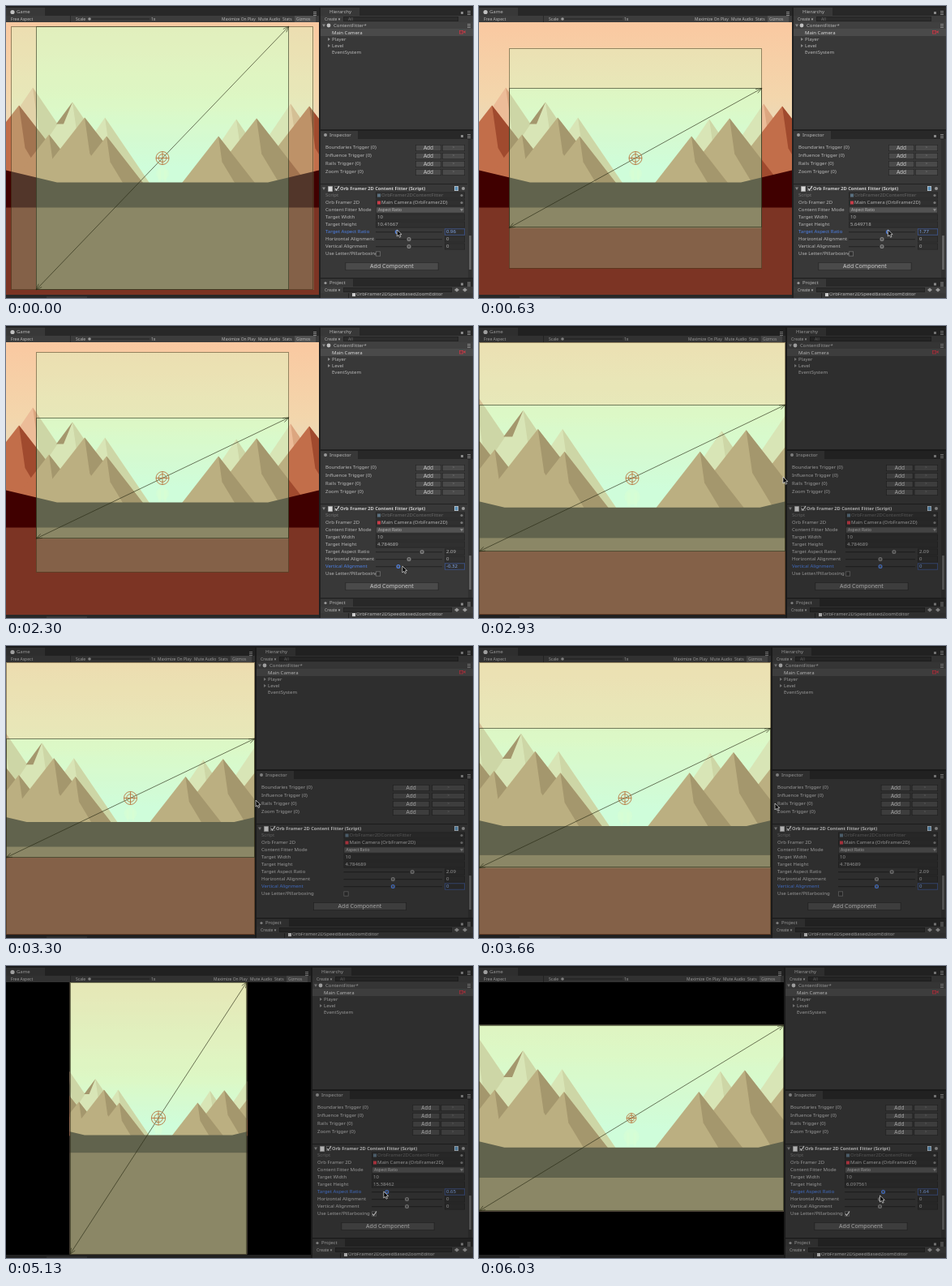
Recreate the animation shown at these times as an HTML page with a canvas. Size 576 by 360 pixels, loop 6.1 s.

```html
<!DOCTYPE html>
<html lang="en">
<head>
<meta charset="utf-8">
<title>Content fitter</title>
<style>
html, body { margin: 0; width: 100%; height: 100%; overflow: hidden; background: #282828; }
canvas { display: block; }
</style>
</head>
<body>
<canvas id="stage" width="576" height="360"></canvas>
<script>
const ctx = document.getElementById('stage').getContext('2d');
const LOOP = 6100, TOP = 20, BOTTOM = 356, MID = 187.5, VIEW_H = BOTTOM - TOP;

// ---- Motion ----

// Eased progress from 0 to 1 between two times
function ease(t, from, to) {
  const u = Math.min(1, Math.max(0, (t - from) / (to - from)));
  return u * u * (3 - 2 * u);
}

const span = (t, from, to) => Math.min(1, Math.max(0, (t - from) / (to - from)));
const aspectAt = t => .96 + 1.13 * ease(t, 130, 900) - 1.44 * ease(t, 4420, 5130) + .99 * ease(t, 5200, 6030);
const alignAt = t => .9 * Math.sin(2 * Math.PI * span(t, 1400, 2670) ** 1.7);
const dividerAt = t =>
  386 - 10 * ease(t, 2760, 3900) - 75 * Math.sin(Math.PI * span(t, 2760, 3900)) ** 3;

// ---- Drawing helpers ----

function rect(x, y, w, h, fill) {
  ctx.fillStyle = fill;
  ctx.fillRect(x, y, w, h);
}

function box(x, y, w, h, fill, line) {
  rect(x, y, w, h, line);
  rect(x + .7, y + .7, w - 1.4, h - 1.4, fill);
}

function poly(pts, fill) {
  ctx.beginPath();
  pts.forEach(p => ctx.lineTo(p[0], p[1]));
  ctx.closePath();
  ctx.fillStyle = fill;
  ctx.fill();
}

function disc(x, y, r, fill) {
  ctx.beginPath();
  ctx.arc(x, y, r, 0, 7);
  ctx.fillStyle = fill;
  ctx.fill();
}

function line(...pts) {
  ctx.beginPath();
  pts.forEach(p => ctx.lineTo(p[0], p[1]));
  ctx.stroke();
}

function text(s, x, y, { color = '#b8b8b8', size = 6, bold = false, align = 'left' } = {}) {
  ctx.font = `${bold ? 'bold ' : ''}${size}px "Noto Sans", "Open Sans", sans-serif`;
  ctx.textAlign = align;
  ctx.textBaseline = 'middle';
  ctx.fillStyle = color;
  ctx.fillText(s, x, y);
}

function clipped(x, y, w, h, draw) {
  ctx.save();
  ctx.beginPath();
  ctx.rect(x, y, w, h);
  ctx.clip();
  draw();
  ctx.restore();
}

// ---- Game scene, in units around the camera centre ----

const FOOT = 31, LIT = '#c26e4a', SHADE = '#a04a2e';
const paleHills = [[-160, -87], [-111, -69], [-71, -50], [158, -67], [91, -48]];
const hills = [[-177, -65], [-140, -29], [-96, -50], [-69, -27], [181, -64], [116, -49], [69, -27]];

function hill(x, y, slope, lit, shade) {
  const half = (FOOT - y) * slope;
  poly([[x, y], [x + half, FOOT], [x - half, FOOT]], lit);
  poly([[x, y], [x + half, FOOT], [x + half * .45, FOOT], [x + half * .1, y + half * .7]], shade);
}

function scene(cx, zoom) {
  ctx.save();
  ctx.translate(cx, MID);
  ctx.scale(zoom, zoom);
  const sky = ctx.createLinearGradient(0, -240, 0, 10);
  sky.addColorStop(0, '#ffbe98');
  sky.addColorStop(.66, '#f3d6ac');
  sky.addColorStop(1, '#dedecb');
  rect(-700, -500, 1400, 1000, sky);
  paleHills.forEach(([x, y]) => hill(x, y, .68, '#ecbc98', '#dca680'));
  poly([[-111, -69], [-131, -42], [-122, -42]], SHADE);
  hills.forEach(([x, y]) => hill(x, y, .78, LIT, SHADE));
  ctx.globalAlpha = .3;
  disc(0, 19, 8, '#f4e0bc');
  [-5, 2].forEach(x => rect(x, 15, 3, 14, '#f4e0bc'));
  ctx.globalAlpha = 1;
  poly([[-700, -105], [-193, 15], [-130, 30], [130, 30], [193, 15], [700, -105], [700, 62], [-700, 62]], '#400000');
  rect(-700, 61, 1400, 800, '#7c3424');
  ctx.restore();
}

// Green veil: dims what lies below, then adds light
function veil(area) {
  rect(...area, 'rgba(0,0,0,.17)');
  ctx.globalCompositeOperation = 'lighter';
  rect(...area, 'rgb(29,54,42)');
  ctx.globalCompositeOperation = 'source-over';
}

function outline([x, y, w, h]) {
  ctx.strokeRect(Math.round(x) + .5, Math.round(y) + .5, Math.round(w) - 1, Math.round(h) - 1);
}

function arrow(x, y, angle) {
  const barb = turn => [x - 8 * Math.cos(angle + turn), y - 8 * Math.sin(angle + turn)];
  line(barb(-.35), [x, y], barb(.35));
}

function crosshair(x, r) {
  ctx.strokeStyle = '#b87440';
  ctx.lineWidth = .9;
  for (const k of [1, .6]) {
    ctx.beginPath();
    ctx.arc(x, MID, r * k, 0, 7);
    ctx.stroke();
  }
  line([x - r, MID], [x + r, MID]);
  line([x, MID - r], [x, MID + r]);
}

function game(W, aspect, align, playing, boxed) {
  const cx = W / 2, ratio = W / VIEW_H;
  const w = playing ? Math.min(W, VIEW_H * aspect) : 312, h = w / aspect;
  const screenW = Math.max(w, h * ratio), screenH = screenW / ratio;
  const target = [cx - w / 2, MID - h / 2, w, h];
  const screen = [cx - screenW / 2, MID - screenH / 2 + align * (screenH - h) / 2, screenW, screenH];
  clipped(0, TOP, W, VIEW_H, () => {
    rect(0, TOP, W, VIEW_H, '#000');
    clipped(...(boxed ? target : [0, TOP, W, VIEW_H]), () => {
      scene(cx, w / 312);
      veil(screen);
      veil(target);
    });
    ctx.lineWidth = 1;
    ctx.strokeStyle = 'rgba(60,40,15,.5)';
    if (!boxed) outline(screen);
    ctx.strokeStyle = 'rgba(40,42,20,.6)';
    outline(target);
    ctx.lineWidth = .8;
    ctx.strokeStyle = 'rgba(40,42,20,.8)';
    const [x, y] = target, angle = Math.atan2(-h, w);
    line([x, y + h], [x + w, y]);
    arrow(x + w, y, angle);
    arrow(x, y + h, angle + Math.PI);
    crosshair(cx, boxed ? 8.6 * h / VIEW_H : 8);
  });
}

// ---- Editor panels ----

const PANEL = '#383838', BAR = '#3c3c3c', DARK = '#282828', BLUE = '#4d80e6', DIM = '#777', RED = '#c83c48';
const SMALL = { size: 5 };

function menuMark(x, y) {
  for (let i = 0; i < 3; i++) rect(x, y + i * 2, 4, 1, '#888');
}

function panel(name, W, y, h, tabW) {
  rect(W + 2, y, 574 - W, h, PANEL);
  rect(W + 2, y, 574 - W, 10, DARK);
  rect(W + 2, y, tabW, 10, PANEL);
  text(name, W + 13, y + 5);
  rect(561, y + 5, 3, 3, '#888');
  menuMark(569, y + 4);
}

function toolbar(W, y, searchW) {
  rect(W + 2, y, 574 - W, 8, BAR);
  text('Create ▾', W + 7, y + 4.2, SMALL);
  box(W + 30, y + 1, searchW, 6, '#2c2c2c', '#202020');
}

function arrowMark(x, y, open) {
  poly(open ? [[x, y - 1.5], [x + 4, y - 1.5], [x + 2, y + 2]] : [[x, y - 2], [x + 3, y], [x, y + 2]], '#888');
}

function tick(x, y) {
  ctx.strokeStyle = '#ddd';
  ctx.lineWidth = 1.2;
  line([x - 2, y], [x - .5, y + 2], [x + 3, y - 3]);
}

function button(label, cx, y, w, h, size, color = '#c8c8c8') {
  box(cx - w / 2, y - h / 2, w, h, '#4a4a4a', '#262626');
  text(label, cx, y, { size, color, align: 'center' });
}

function gameBar(W) {
  rect(0, 2, W, 10, DARK);
  rect(0, 2, 48, 10, PANEL);
  disc(8, 7.5, 2.6, '#c0c0c0');
  text('Game', 13, 7.5);
  menuMark(W - 7, 7);
  rect(0, 12, W, 8, BAR);
  text('Free Aspect', 6, 16.2, SMALL);
  rect(79, 12, .7, 8, '#222');
  text('Scale', 86, 16.2, SMALL);
  rect(103, 15.5, 74, 1, '#222');
  disc(103, 16, 1.8, '#999');
  text('1x', 179, 16.2, SMALL);
  rect(W - 30, 12, 26, 8, '#505050');
  [['Maximize On Play', 120], ['Mute Audio', 75], ['Stats', 45], ['Gizmos', 28]]
    .forEach(([s, dx]) => text(s, W - dx, 16.2, SMALL));
  rect(0, BOTTOM, W, 4, DARK);
  rect(50, 358, 50, 2, PANEL);
}

function hierarchy(W) {
  panel('Hierarchy', W, 2, 150, 48);
  toolbar(W, 12, 528 - W);
  text('All', W + 36, 16.2, { size: 5, color: DIM });
  rect(W + 2, 20, 574 - W, 8, '#404040');
  arrowMark(W + 4, 24, true);
  disc(W + 12, 24, 2.4, '#c0c0c0');
  text('ContentFitter*', W + 18, 24.5);
  menuMark(569, 22);
  rect(W + 2, 28, 574 - W, 9, '#4a4a4a');
  ['Main Camera', 'Player', 'Level', 'EventSystem'].forEach((s, i) => {
    const y = 33 + i * 8;
    text(s, W + 16, y, { color: i ? '#b8b8b8' : '#dcdcdc' });
    if (i === 1 || i === 2) arrowMark(W + 11, y, false);
  });
  box(559, 30, 5, 4.5, '#703840', RED);
  poly([[564, 32], [566.5, 30], [566.5, 34]], RED);
}

function inspector(W, aspect, align, boxed, focus) {
  const x = W + 8, shift = 386 - W, fx = 456 - shift / 2;
  const rowY = i => 233.5 + i * 9;
  panel('Inspector', W, 154, 181, 46);
  disc(W + 8, 159, 2, '#999');
  ['Boundaries', 'Influence', 'Rails', 'Zoom'].forEach((s, i) => {
    const y = 174.5 + i * 10;
    text(`${s} Trigger (0)`, x, y);
    button('Add', 521 - shift * .27, y + .5, 32 + shift * .17, 8, 6.5);
    button('>', 552 - shift * .08, y + .5, 28 + shift * .16, 8, 5, DIM);
  });

  rect(W + 2, 219, 567 - W, 1, '#222');
  arrowMark(W + 4, 225, true);
  box(W + 11, 222, 6, 7, '#d8d8d8', '#888');
  box(W + 19, 222, 6, 6, '#2c2c2c', '#777');
  tick(W + 22, 225);
  text('Orb Framer 2D Content Fitter (Script)', W + 26, 225.3, { bold: true, size: 5.7, color: '#d0d0d0' });
  box(553, 222, 5, 6, '#5a90b8', '#ccc');
  disc(564, 225, 2, '#999');

  const labels = ['Script', 'Orb Framer 2D', 'Content Fitter Mode', 'Target Width', 'Target Height',
    'Target Aspect Ratio', 'Horizontal Alignment', 'Vertical Alignment', 'Use Letter/Pillarboxing'];
  clipped(W, 228, fx - W + 1, 84, () => labels.forEach((s, i) =>
    text(s, x, rowY(i), { color: i === focus ? BLUE : i ? '#b8b8b8' : DIM })));

  const field = (i, s, icon, color = '#b0b0b0') => {
    const y = rowY(i);
    box(fx, y - 4, 566 - fx, 8, '#303030', '#242424');
    text(s, fx + (icon ? 7 : 2), y, { color });
    if (icon) {
      rect(fx + 2, y - 2, 4, 4, icon);
      disc(562, y, 1.6, DIM);
    }
  };
  field(0, 'OrbFramer2DContentFitter', '#5a7080', '#666');
  field(1, 'Main Camera (OrbFramer2D)', RED);
  box(fx, rowY(2) - 4, 566 - fx, 8, '#525252', '#262626');
  text('Aspect Ratio', fx + 3, rowY(2), SMALL);
  arrowMark(560, rowY(2), true);
  field(3, '10');
  field(4, String(Number((10 / aspect).toPrecision(7))));

  const slider = (i, k, value) => {
    const on = i === focus, y = rowY(i), hx = fx + (538 - fx) * k;
    rect(fx, y - .3, 538 - fx, 1, '#222');
    disc(hx, y, 2.5, on ? BLUE : '#888');
    disc(hx, y, 1.4, '#505050');
    box(541, y - 4, 25, 8, '#303030', on ? '#3c589c' : '#242424');
    text(value, 543, y, { color: on ? '#80a8f0' : '#b0b0b0' });
    return hx;
  };
  const aspectX = slider(5, aspect / 3, aspect.toFixed(2));
  slider(6, .5, '0');
  const alignX = slider(7, (align + 1) / 2, String(align));
  box(fx, rowY(8) - 3, 6, 6, '#303030', '#777');
  if (boxed) tick(fx + 3, rowY(8));

  button('Add Component', (W + 566) / 2, 321, 115, 10, 7);
  rect(570, 164, 5, 171, '#303030');
  rect(571, 283, 3, 42, '#606060');
  return { aspectX, alignX, fx };
}

function project(W) {
  panel('Project', W, 336.5, 24, 40);
  disc(W + 8, 341.5, 1.6, '#999');
  toolbar(W, 346, 520 - W);
  [556, 566].forEach(x => poly([[x, 347.5], [x + 3, 350], [x, 352.5], [x - 3, 350]], '#999'));
  rect(W + 36, 354, 1, 6, '#222');
  clipped(W + 37, 353.5, 538 - W, 7, () => {
    rect(W + 41, 354, 4, 4, '#ccc');
    text('OrbFramer2DSpeedBasedZoomEditor', W + 46, 355);
  });
}

function cursor(x, y) {
  ctx.save();
  ctx.translate(x, y - 1);
  poly([[0, 0], [0, 8], [1.9, 6.3], [3.2, 9.2], [4.6, 8.5], [3.4, 5.8], [5.8, 5.6]], '#000');
  ctx.strokeStyle = '#e8e8e8';
  ctx.lineWidth = .7;
  ctx.stroke();
  ctx.restore();
}

// The pointer glides from one control to the next and follows it
function pointerAt(t, W, { aspectX, alignX, fx }) {
  const moves = [
    [950, 1380, alignX + 5, 297],
    [2640, 2800, W - 3, 187],
    [2930, 3660, W + 5, 195],
    [3900, 4130, fx + 3, 304],
    [4200, 4400, aspectX - 4, 279],
    [5200, 6030, aspectX - 4, 284],
  ];
  return moves.reduce(([x, y], [from, to, nx, ny]) => {
    const k = ease(t, from, to);
    return [x + (nx - x) * k, y + (ny - y) * k];
  }, [aspectX, 277]);
}

function draw(t) {
  const W = Math.round(dividerAt(t));
  const aspect = Number(aspectAt(t).toFixed(2)), align = Number(alignAt(t).toFixed(2)) || 0;
  const playing = t >= 2690, boxed = t >= 4200;
  const focus = t >= 1380 && t < 4400 ? 7 : 5;

  rect(0, 0, 576, 360, '#202020');
  gameBar(W);
  hierarchy(W);
  const spots = inspector(W, aspect, align, boxed, focus);
  project(W);
  if (playing) rect(0, 0, 576, 360, 'rgba(0,0,0,.18)');
  game(W, aspectAt(t + 20), align, playing, boxed);
  cursor(...pointerAt(t, W, spots));
}

const start = performance.now();
function loop() {
  draw((performance.now() - start) % LOOP);
  requestAnimationFrame(loop);
}
loop();
</script>
</body>
</html>
```
